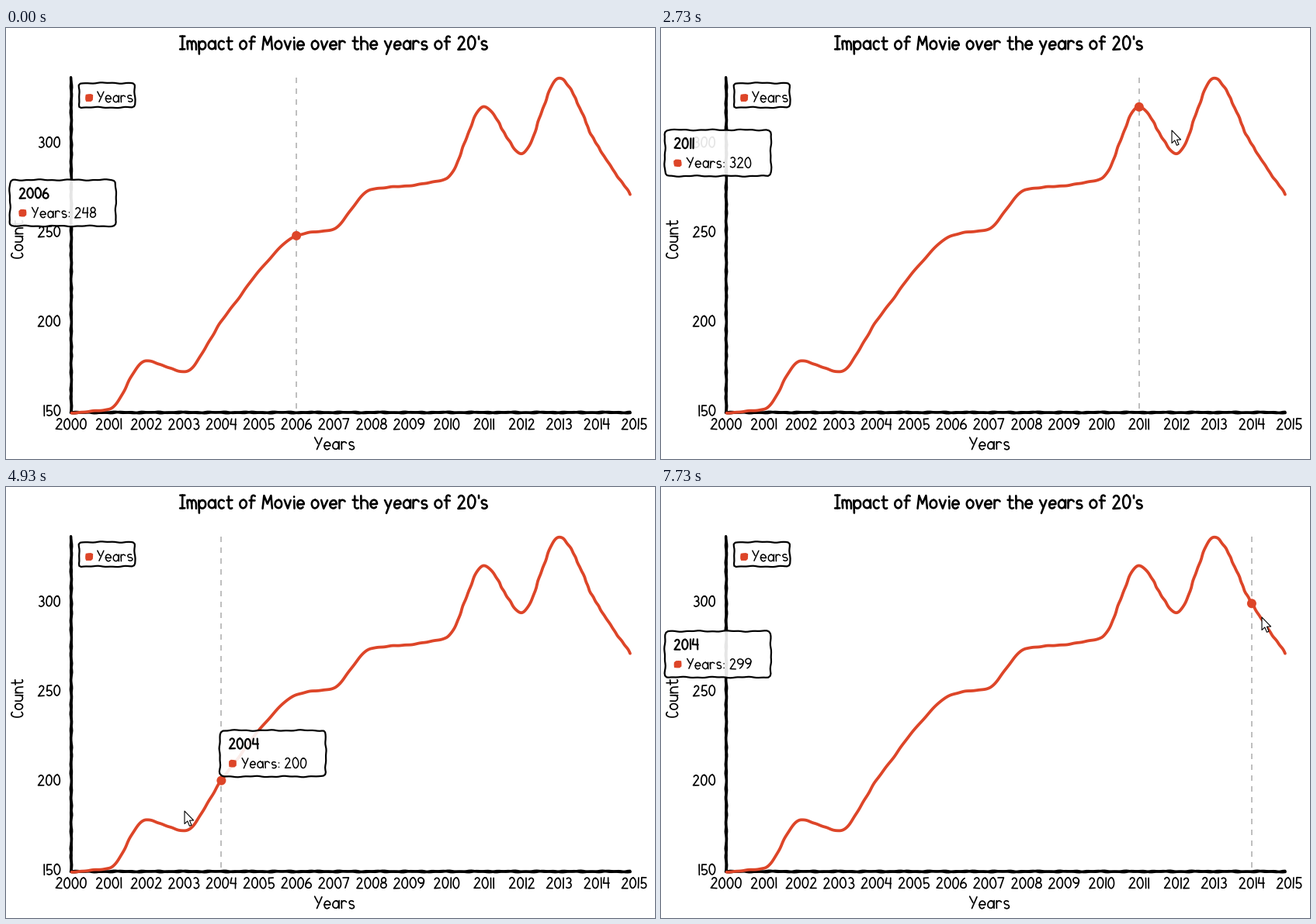
Write a matplotlib script that moves like this. It is 836 px wide and 556 px high and loops after 7800 ms.

```python
import numpy as np
import matplotlib.pyplot as plt
from matplotlib.animation import FuncAnimation
from matplotlib.collections import LineCollection
from matplotlib.patches import Circle, Polygon

W, H, PT = 836, 556, 0.72
RED, GREY = "#dd4528", "#aaaaaa"
LEFT, TOP, BASE, RIGHT = 84, 64, 496, 804
STEP = 48.35
COUNTS = np.array([149, 151, 178, 172, 200, 228, 248, 252,
                   274, 276, 280, 320, 294, 336, 299, 268])
TICKS = 117          # pointer samples per loop
FRAMES, INTERVAL = 195, 40


# ---------- stroke font built from bowls, stems and arches (cap height 1) ----------
XH, GAP, SPACE = .64, .22, .38


def line(*c):
    return np.reshape(c, (-1, 2)).astype(float)


def arc(cx, cy, rx, ry, a0, a1):
    a = np.radians(np.linspace(a0, a1, 24))
    return np.column_stack([cx + rx * np.cos(a), cy + ry * np.sin(a)])


def join(*parts):
    return np.vstack(parts)


def stem(x=0, top=XH, foot=0):
    return line(x, top, x, foot)


def bar(y, w):
    return line(0, y, w, y)


def bowl(a0=80, a1=445):
    return arc(.26, XH / 2, .26, XH / 2, a0, a1)


def tall(a0=80, a1=445):
    return arc(.28, .5, .28, .5, a0, a1)


def upper(a0=80, a1=445):
    return arc(.27, .76, .22, .24, a0, a1)


def lower(a0=80, a1=445):
    return arc(.27, .26, .27, .26, a0, a1)


def arch(x, w):
    return join(arc(x + w / 2, XH * .6, w / 2, XH * .4, 180, 0), line(x + w, 0))


def turn(strokes, w, h):
    """Rotate a glyph by half a turn inside its box."""
    return [(w, h) - s for s in strokes]


def make_font():
    n = [stem(), arch(0, .5)]
    six = [lower(), arc(.54, .26, .54, .74, 180, 110)]
    return {
        "0": [tall()],
        "1": [stem(.05, 1)],
        "2": [join(upper(160, -30), line(0, 0, .55, 0))],
        "3": [upper(140, -90), lower(90, -140)],
        "4": [line(.08, 1, 0, .47, .54, .47), stem(.46, 1)],
        "5": [join(line(.5, 1, .08, 1), lower(140, -140))],
        "6": six,
        "7": [line(0, 1, .54, 1, .18, 0)],
        "8": [upper(), lower()],
        "9": turn(six, .54, 1),
        "C": [tall(52, 308)],
        "I": [bar(1, .36), stem(.18, 1), bar(0, .36)],
        "M": [line(0, 0, .1, 1, .38, .35, .66, 1, .75, 0)],
        "Y": [line(0, 1, .3, .5), line(.62, 1, .2, 0)],
        "a": [bowl(), stem(.54)],
        "c": [bowl(50, 310)],
        "e": [join(bar(XH / 2, .5), bowl(0, 315))],
        "f": [join(arc(.32, .82, .16, .18, 45, 180), line(.16, 0)), bar(.6, .42)],
        "h": [stem(0, 1), arch(0, .5)],
        "i": [stem(.05), stem(.05, .93, .9)],
        "m": [stem(), arch(0, .33), arch(.33, .33)],
        "n": n,
        "o": [bowl()],
        "p": [stem(0, XH, -.36), bowl()],
        "r": [stem(), arc(.23, .38, .23, XH - .38, 180, 35)],
        "s": [join(arc(.22, XH * .75, .2, XH / 4, 40, 270),
                   arc(.22, XH / 4, .22, XH / 4, 90, -140))],
        "t": [join(line(.16, .95), arc(.32, .16, .16, .16, 180, 310)), bar(XH, .42)],
        "u": turn(n, .5, XH),
        "v": [line(0, XH, .22, 0, .48, XH)],
        "y": [line(0, XH, .25, .1), line(.5, XH, .14, -.36)],
        "'": [stem(.06, 1, .78)],
        ":": [stem(.05, .52, .5), stem(.05, .1, .08)],
    }


FONT = make_font()


def shake(p, amp=0.5, phase=0.0):
    """Displace points by a smooth, position-based ripple."""
    x, y = p[:, 0], p[:, 1]
    dx = np.sin(.17 * y + .06 * x + phase) + .6 * np.sin(.41 * y + .2 * x + 2 * phase)
    dy = np.sin(.15 * x + .05 * y + 1 + phase) + .6 * np.sin(.37 * x + .23 * y + phase)
    return p + amp * np.column_stack([dx, dy])


def write(s, x, y, size, anchor=0.0, upright=True):
    """Strokes of a text whose baseline starts, centres or ends at (x, y)."""
    strokes, pen = [], 0.0
    for ch in s:
        if ch == " ":
            pen += SPACE
            continue
        strokes += [g + (pen, 0) for g in FONT[ch]]
        pen += max(g[:, 0].max() for g in FONT[ch]) + GAP
    shift = (pen - GAP) * anchor
    out = []
    for g in strokes:
        u, v = (g[:, 0] - shift) * size, g[:, 1] * size
        xy = (x + u, y - v) if upright else (x - v, y - u)
        out.append(shake(np.column_stack(xy), .25))
    return out


# ---------- sketchy shapes ----------
def dense(p, step=3.0):
    s = np.r_[0, np.cumsum(np.hypot(*np.diff(p, axis=0).T))]
    q = np.linspace(0, s[-1], max(2, int(s[-1] / step)))
    return np.column_stack([np.interp(q, s, p[:, 0]), np.interp(q, s, p[:, 1])])


def box(x, y, w, h, r, amp=.5):
    corners = [(x + w - r, y + h - r), (x + r, y + h - r),
               (x + r, y + r), (x + w - r, y + r)]
    p = join(*[arc(cx, cy, r, r, 90 * i, 90 * i + 90)
               for i, (cx, cy) in enumerate(corners)])
    return shake(dense(join(p, p[:1])), amp)


# ---------- data curve ----------
def count_y(v):
    return 494 - (v - 150) * 2.307


PX = LEFT + STEP * np.arange(len(COUNTS))
PY = count_y(COUNTS)


def slopes():
    s = np.diff(PY)
    a, b = s[:-1], s[1:]
    m = (np.sign(a) + np.sign(b)) * np.minimum(
        np.minimum(abs(a), abs(b)), abs(a + b) / 4)
    return np.r_[(3 * s[0] - m[0]) / 2, m, (3 * s[-1] - m[-1]) / 2]


def curve_y(x):
    """Monotone cubic through the yearly counts."""
    u = (x - LEFT) / STEP
    i = np.clip(u.astype(int), 0, len(PY) - 2)
    t, m = u - i, slopes()
    return (PY[i] * (1 - 3 * t**2 + 2 * t**3) + PY[i + 1] * (3 * t**2 - 2 * t**3)
            + m[i] * (t**3 - 2 * t**2 + t) + m[i + 1] * (t**3 - t**2))


# ---------- pointer: straight strokes between (tick, x, y) poses ----------
POSES = np.array([
    (8, 374, 296), (25, 568, 184), (28, 568, 184), (39, 616, 95),
    (41, 658, 132), (48, 780, 265), (60, 352, 267), (72, 285, 410),
    (74, 230, 418), (79, 110, 370), (88, 730, 93), (90, 774, 168),
    (94, 774, 168), (104, 568, 184), (114, 774, 168)])


def pointer(k):
    t, x, y = POSES.T
    return np.interp(k, t, x), np.interp(k, t, y)


# ---------- stage ----------
fig = plt.figure(figsize=(W / 100, H / 100), dpi=100, facecolor="white")
ax = fig.add_axes([0, 0, 1, 1])
ax.set(xlim=(0, W), ylim=(H, 0))
ax.axis("off")


def ink(strokes, width, color="black", z=2):
    lines = LineCollection(strokes, linewidths=width * PT, colors=color,
                           capstyle="round", joinstyle="round", zorder=z)
    return ax.add_collection(lines, autolim=False)


def shape(p, face, edge="none", width=0.0, z=2):
    return ax.add_patch(Polygon(p, closed=True, facecolor=face, edgecolor=edge,
                                linewidth=width * PT, joinstyle="round", zorder=z))


ink(write("Impact of Movie over the years of 20's", 422, 27.5, 16.6, .5), 2.6)
labels = write("Years", 423, 543.5, 15, .5)
labels += write("Count", 21.5, 273, 14.8, .5, upright=False)
for v in (150, 200, 250, 300):
    labels += write(str(v), 69.5, count_y(v) + 6, 13.2, 1)
for i, x in enumerate(PX):
    labels += write(str(2000 + i), x, 517.5, 13.4, .5)
ink(labels, 1.7)

y_axis = dense(line(LEFT, TOP, LEFT, BASE))
x_axis = dense(line(LEFT, BASE, RIGHT, BASE))
ink([shake(a, .55, f) for a in (y_axis, x_axis) for f in (0, 2.2)], 3.3, z=1)
xs = np.linspace(LEFT, RIGHT, 500)
ink([shake(np.column_stack([xs, curve_y(xs)]), .4)], 3.8, RED, 3)

shape(box(94, 71, 72, 31.5, 4), "white", "black", 2.2, 4)
shape(box(102, 85, 10, 10, 2, .2), RED, z=5)
ink(write("Years", 117.5, 95.5, 13.2), 1.5, z=5)

guide, = ax.plot([], [], color=GREY, lw=1.5 * PT, dashes=(7 / 1.5, 7 / 1.5), zorder=2)
dot = ax.add_patch(Circle((0, 0), 6, color=RED, lw=0, zorder=4))
tip = shape([(0, 0)], (1, 1, 1, .9), "black", 2.2, 6)
swatch = shape([(0, 0)], RED, z=7)
tip_year = ink([], 2.2, z=7)
tip_count = ink([], 1.5, z=7)
ARROW = line(0, 0, 0, 16.5, 3.8, 13, 6.4, 19.3, 9, 18.2, 6.5, 12.2, 11.6, 12)
arrow = shape(ARROW, "white", "black", 1.1, 9)


def update(i):
    k = int((i * INTERVAL + 30) * TICKS / (FRAMES * INTERVAL))
    arrow.set_xy(ARROW + pointer(k))
    arrow.set_visible(k >= POSES[0, 0])

    # the chart reacts one tick after the pointer
    mx, my = pointer(k - 1)
    n = int(np.clip(round((mx - LEFT) / STEP), 0, len(PX) - 1))
    guide.set_data([PX[n], PX[n]], [TOP, BASE])
    dot.center = PX[n], PY[n]

    left = 5 if PX[n] + 5 > 360 else PX[n] - 2
    top = my + 18 if my < 216 else my - 100
    tip.set_xy(box(left, top, 136.5, 59.5, 5))
    swatch.set_xy(box(left + 11.5, top + 38, 10, 9.5, 2, .2))
    tip_year.set_segments(write(str(2000 + n), left + 12.5, top + 23.5, 12.9))
    tip_count.set_segments(write(f"Years: {COUNTS[n]}", left + 28.5, top + 48.5, 12.9))
    return guide, dot, tip, swatch, tip_year, tip_count, arrow


anim = FuncAnimation(fig, update, frames=FRAMES, interval=INTERVAL,
                     repeat=True, repeat_delay=0, blit=False)
plt.show()
```
